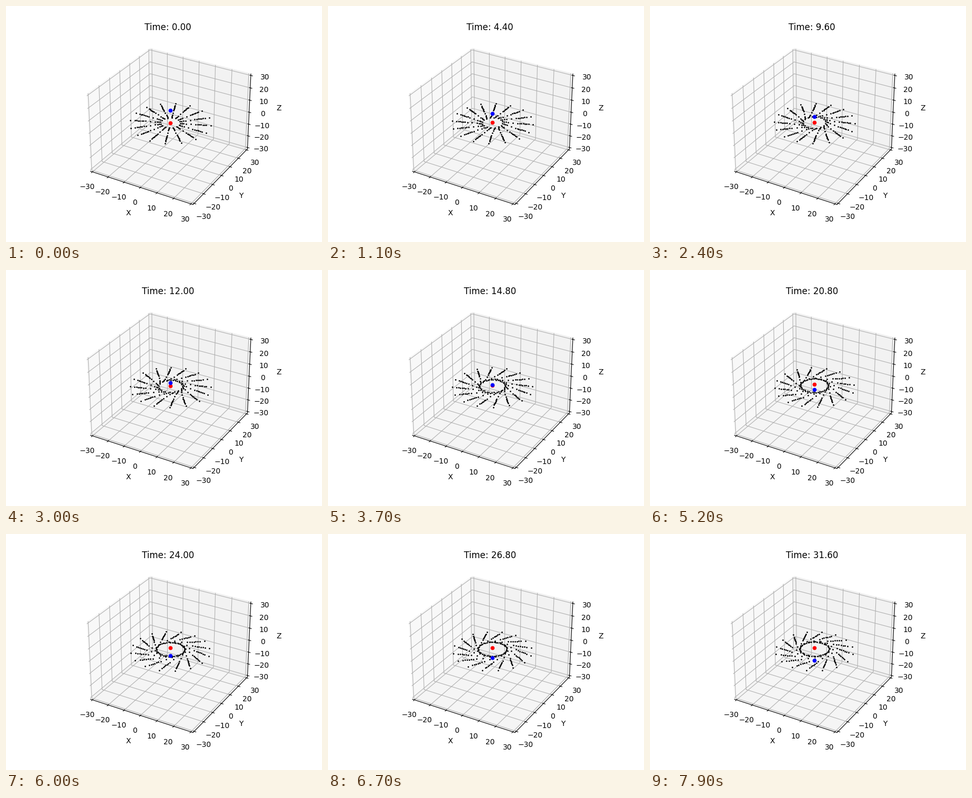
Write a matplotlib script that moves like this. It is 600 by 450 pixels and loops after 8 s.

```python
import numpy as np
import matplotlib.pyplot as plt
from matplotlib.animation import FuncAnimation

FRAMES = 80
INTERVAL = 100
STEP = 0.4          # simulated time per frame
SUBSTEPS = 20
SOFT = 5.0          # softening length of the pull
SPOKES = 16

RADII = np.array([5.3, 6.2, 7.1, 8.3, 10.9, 13.4, 14.6,
                  15.5, 16.4, 17.3, 18.2, 19.2, 21.5])


def pull(pos, center):
    """Softened attraction of points towards a unit mass."""
    d = center - pos
    return d / (np.sum(d * d, axis=-1, keepdims=True) + SOFT**2) ** 1.5


def accel(pos):
    # rows 0 and 1 are the two masses; the rest are massless
    return pull(pos, pos[0]) + pull(pos, pos[1])


def start_state():
    angle, r = np.meshgrid(np.arange(SPOKES) * 2 * np.pi / SPOKES, RADII)
    angle, r = angle.ravel(), r.ravel()
    zero = np.zeros_like(r)
    speed = 1 / np.sqrt(r)
    disk = np.column_stack([r * np.cos(angle), r * np.sin(angle), zero])
    spin = np.column_stack([-speed * np.sin(angle), speed * np.cos(angle), zero])
    pos = np.vstack([[0, 0, 0], [0, 0, 10], disk])
    vel = np.vstack([[0, 0, 0], [0, 0, -0.5], spin])
    return pos, vel


def simulate():
    pos, vel = start_state()
    dt = STEP / SUBSTEPS
    path = [pos.copy()]
    for _ in range(FRAMES - 1):
        for _ in range(SUBSTEPS):
            vel = vel + accel(pos) * dt / 2
            pos = pos + vel * dt
            vel = vel + accel(pos) * dt / 2
        path.append(pos.copy())
    return path


path = simulate()

plt.rcParams["axes3d.automargin"] = True
fig = plt.figure(figsize=(6, 4.5), dpi=100)
ax = fig.add_subplot(projection="3d")


def dots(color, size, order):
    return ax.plot([], [], [], "o", color=color, ms=size, zorder=order)[0]


stars = dots("black", 1, 2)
red = dots("red", 4.5, 3)
blue = dots("blue", 4.5, 4)

ax.set(xlim=(-30, 30), ylim=(-30, 30), zlim=(-30, 30),
       xlabel="X", ylabel="Y", zlabel="Z")
title = ax.set_title("Time: 0.00")


def update(i):
    pos = path[i]
    stars.set_data_3d(*pos[2:].T)
    red.set_data_3d(*pos[:1].T)
    blue.set_data_3d(*pos[1:2].T)
    title.set_text(f"Time: {i * STEP:.2f}")
    return stars, red, blue, title


anim = FuncAnimation(fig, update, frames=FRAMES, interval=INTERVAL,
                     repeat=True, repeat_delay=0)
plt.show()
```
